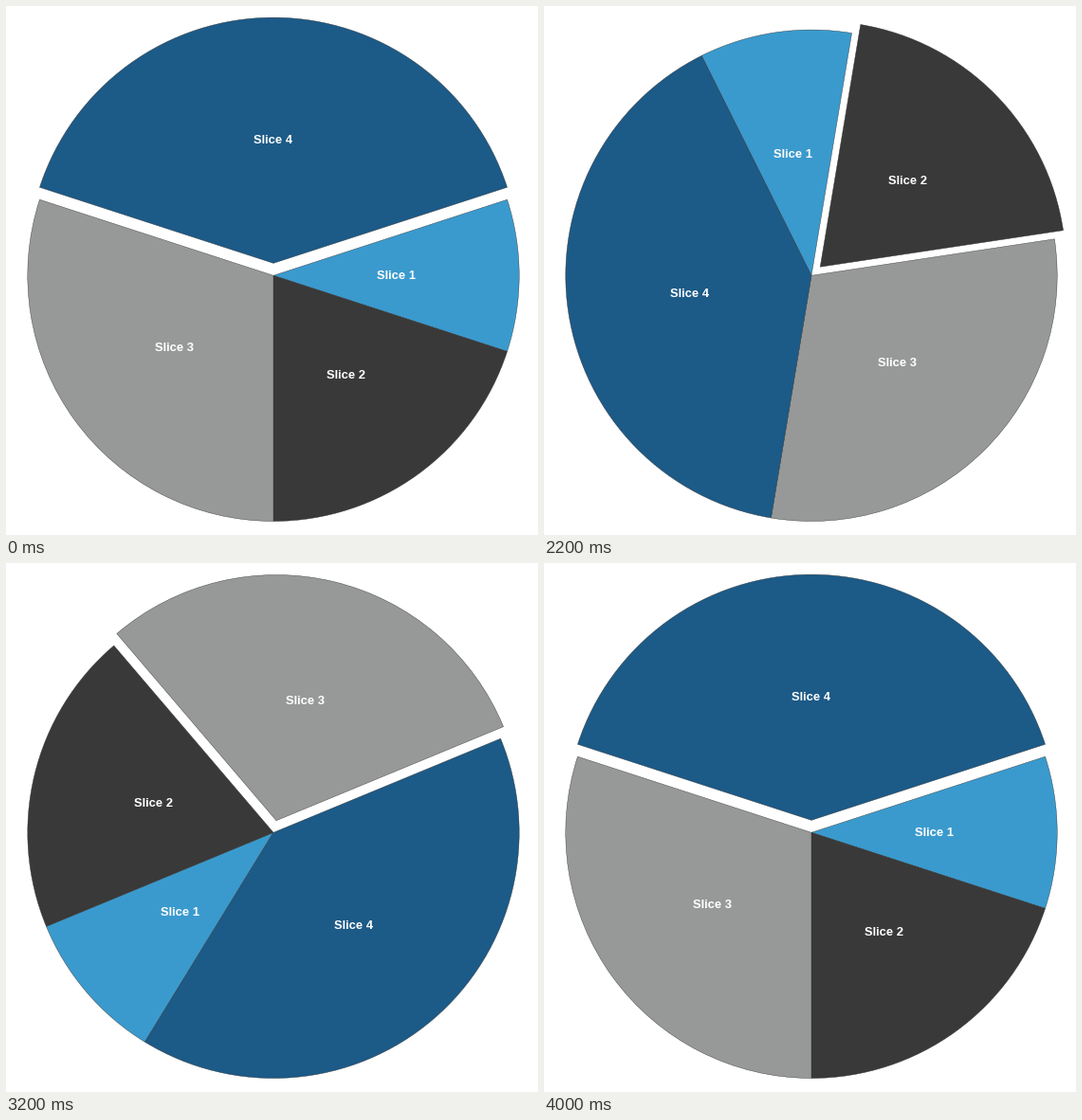
A matplotlib script for the animation above (7600 ms loop, 561x558 px).

```python
import math

import matplotlib.pyplot as plt
from matplotlib.animation import FuncAnimation
from matplotlib.patches import Wedge

W, H, DPI = 561, 558, 64
PX = 72 / DPI                      # points per pixel
STEP, LOOP = 200, 7600             # ms
CX, CY, R = 282, 284.3, 259.2
PULL = 0.05 * R

SHARES = [36, 72, 108, 144]        # degrees, clockwise
COLORS = ["#3a9acd", "#393939", "#979998", "#1c5a87"]
STARTS = [sum(SHARES[:i]) for i in range(4)]
MIDS = [a + b / 2 for a, b in zip(STARTS, SHARES)]

# (start ms, duration ms, slice turned to the top)
TURNS = [(1125, 430, 0), (2088, 430, 1), (2879, 430, 2), (3600, 344, 3)]


def swing(p):
    p = min(max(p, 0), 1)
    return 0.5 - 0.5 * math.cos(math.pi * p)


def pose(t):
    """Clockwise turn of the pie and the pulled-out slice at time t."""
    turn, pulled = 360 - MIDS[3], 3
    for start, length, index in TURNS:
        if t < start:
            break
        turn += (-MIDS[index] - turn) * swing((t - start) / length)
        pulled = index
    return turn, pulled


def polar(radius, angle):
    """Point at a clockwise angle from the top of the pie."""
    a = math.radians(angle)
    return CX + radius * math.sin(a), CY - radius * math.cos(a)


fig = plt.figure(figsize=(W / DPI, H / DPI), dpi=DPI, facecolor="white")
ax = fig.add_axes([0, 0, 1, 1])
ax.set_xlim(0, W)
ax.set_ylim(H, 0)
ax.axis("off")

wedges, labels = [], []
for i, color in enumerate(COLORS):
    wedge = Wedge((CX, CY), R, 0, SHARES[i], facecolor=color,
                  edgecolor="#333333", linewidth=0.4 * PX)
    wedges.append(ax.add_patch(wedge))
    labels.append(ax.text(CX, CY, f"Slice {i + 1}", color="white",
                          family="Liberation Sans", weight="bold",
                          size=13 * PX, ha="center", va="center", zorder=5))


def draw(frame):
    turn, pulled = pose(frame * STEP)
    for i, (wedge, label) in enumerate(zip(wedges, labels)):
        out = PULL if i == pulled else 0
        mid = turn + MIDS[i]
        first = turn + STARTS[i] - 90
        wedge.set_center(polar(out, mid))
        wedge.set_theta1(first)
        wedge.set_theta2(first + SHARES[i])
        x, y = polar(R / 2 + out, mid)
        label.set_position((x, y + 0.4))
    return wedges + labels


anim = FuncAnimation(fig, draw, frames=LOOP // STEP, interval=STEP,
                     repeat=True, repeat_delay=0, blit=False)
plt.show()
```
